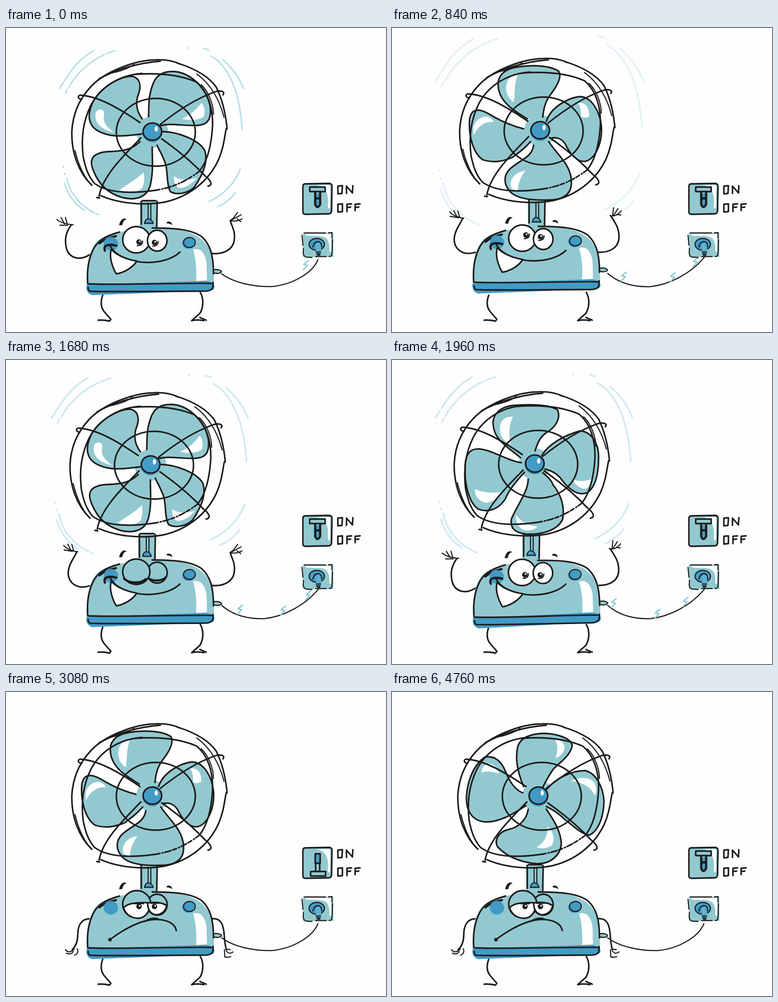
Write an HTML page that moves like this. It is 837x669 px and loops after 5040 ms.

```html
<!DOCTYPE html>
<html lang="en">
<head>
<meta charset="utf-8">
<title>Happy fan</title>
<style>
html, body { margin: 0; width: 100%; height: 100%; overflow: hidden; background: #fefefe; }
svg { display: block; width: 100vw; height: 100vh; }
path, ellipse, rect, circle { fill: none; stroke-linecap: round; stroke-linejoin: round; }
.ink { stroke: #1d1b1b; stroke-width: 3.4; }
.thin { stroke-width: 2.4; }
.bold { stroke-width: 4.8; }
.teal { fill: #92c9d0; }
.blue { fill: #429bc5; }
.pale { fill: #5fb0d4; }
.white { fill: #fefefe; }
.black { fill: #1d1b1b; }
.zap { stroke: #8fcbd4; stroke-width: 3; }
#air { stroke: #a4d5e0; stroke-width: 3.6; }
#burst { stroke: #93cbdc; stroke-width: 2.6; }
</style>
</head>
<body>
<svg viewBox="0 0 837 669" preserveAspectRatio="none">
<g id="head">
  <g id="air">
    <path d="M118 133L127 119M130 115C147 86 168 64 193 50"/>
    <path d="M131 143L135 135M138 131C153 102 183 74 216 59M220 57L240 50"/>
    <path d="M401 44h1M436 45L446 48M452 62L464 70C501 102 516 160 520 223M478 70C503 92 515 112 523 133"/>
    <path d="M126 305v2M129 320v2M134 330C140 364 165 393 195 407M129 342C139 373 154 390 173 401M199 409L204 411"/>
    <path d="M447 382C484 364 505 340 516 310M466 393C484 386 498 373 505 362"/>
  </g>
  <path class="teal" d="M295 380H334V446H295Z"/>
  <path class="ink" d="M298 382V432M333 382L332 437"/>
  <path class="ink thin" d="M313 386V421M319 386V421"/>
  <path class="blue ink thin" d="M305 430C306 417 321 416 324 430Z"/>
  <path class="ink" d="M300 380H330"/>
  <g id="blades"></g>
  <path class="ink" d="M189 346C160 318 144 275 145 228C147 190 160 158 186 130C215 98 280 71 330 70C352 69 368 72 382 79"/>
  <path class="ink" d="M205 112C240 92 290 77 340 73M377 77C422 91 449 110 463 130C477 158 484 190 487 222"/>
  <path class="ink thin" d="M232 99C250 96 270 89 282 80M420 101C452 124 471 160 480 196"/>
  <path class="ink" d="M485 222C481 240 480 262 468 290C445 340 400 372 350 383C300 392 245 385 209 369M200 373L206 374"/>
  <path class="ink" d="M300 100C250 103 208 130 187 170C170 205 165 240 170 283C175 308 181 326 195 342C225 364 275 365 330 357"/>
  <path class="ink" stroke-dasharray="9 5 2 4 14 4" d="M330 357C370 350 395 338 425 316"/>
  <path class="ink" d="M425 316C447 290 453 250 455 215C456 175 445 140 420 119C385 104 340 98 285 102"/>
  <path class="ink thin" d="M430 125C447 140 457 170 457 190M152 270C160 303 170 322 181 337"/>
  <ellipse class="ink" cx="330" cy="229.500" rx="87" ry="74.500"/>
  <path class="ink" d="M166 157C157 156 157 147 166 148C202 151 242 172 295 208"/>
  <path class="ink" d="M478 147C484 138 470 137 459 141C420 155 380 180 340 212"/>
  <path class="ink" d="M343 244C380 270 410 295 438 325C451 335 457 346 445 348"/>
  <path class="ink" d="M297 242C260 280 213 325 205 370"/>
  <ellipse class="blue" cx="322" cy="231" rx="22" ry="21" opacity=".8"/>
  <ellipse class="blue ink" cx="322.500" cy="228" rx="20.500" ry="19"/>
  <ellipse class="white" cx="331" cy="222" rx="3.500" ry="6"/>
</g>

<g class="ink">
  <path id="legL"/>
  <path data-leg="0" d="M428 582C436 596 435 615 427 628L409 644Q422 641 436 644M427 637L441 643"/>
  <path data-leg="1" d="M438 586C440 600 447 612 443 621L437 636L463 620M437 636L452 629"/>
</g>
<g class="ink" id="arms">
  <g data-left="A"><path d="M184 499C160 514 139 505 133 485C128 463 133 448 144 433"/><path class="thin" d="M112 421Q122 431 148 433M121 417L129 431M131 417L135 431M119 434L136 434"/></g>
  <g data-left="B"><path d="M184 497C156 506 138 490 137 470C137 450 150 436 156 422"/><path class="thin" d="M127 408Q136 419 158 422M136 405L143 419M145 406L149 420M128 418L146 421"/></g>
  <g data-left="D"><path d="M183 499C165 500 158 515 158 535C158 550 153 560 146 567"/><path class="thin" d="M131 567Q138 577 150 566M133 575Q144 579 148 571M157 565Q161 575 151 579"/></g>
  <g data-right="A"><path d="M453 496C478 499 501 488 503 465C505 447 498 438 494 424L500 420"/><path class="thin" d="M494 424Q508 427 520 420M498 422L518 411M499 421L510 406M509 420L517 426"/></g>
  <g data-right="B"><path d="M454 497C484 498 500 484 500 463C500 443 492 433 482 417"/><path class="thin" d="M480 416Q492 421 505 406M488 416L498 401M486 416L488 399M495 414L504 415"/></g>
  <g data-right="D"><path d="M453 499C475 496 480 515 481 540C482 555 484 562 485 567"/><path class="thin" d="M481 567L482 583Q490 585 495 582M485 569Q491 579 500 572M487 566L494 567"/></g>
</g>

<path class="ink thin" id="cord"/>
<g id="zaps"></g>

<g id="body">
  <path class="teal ink thin" d="M457 532Q470 530 475 536Q472 542 457 539"/>
  <path class="teal" d="M178 578C176 530 180 490 202 468C225 450 285 440 335 440C400 440 435 458 450 490C460 520 458 560 458 575Z"/>
  <path class="white" d="M412 488C430 481 442 500 442 525C442 545 444 555 440 562L418 562C421 535 418 505 412 488Z"/>
  <path class="blue" d="M179 563C240 563 350 560 440 556C461 560 463 571 455 577C380 581 260 585 190 588C178 585 174 572 179 563Z"/>
  <path class="ink" d="M180 562C178 535 182 510 190 492C200 468 218 458 250 449"/>
  <path class="ink" d="M322 440C370 440 410 443 432 460C450 477 457 500 457 541"/>
  <path class="ink" d="M182 563C260 566 370 561 455 562M181 571C181 584 190 578 202 580C280 580 370 580 440 579C455 578 457 572 456 560"/>
  <path class="ink bold" d="M206 474Q218 463 242 458"/>
  <ellipse class="blue" cx="231" cy="475" rx="16" ry="15"/>
  <ellipse class="blue" cx="402" cy="474" rx="14" ry="12"/>
  <ellipse class="ink thin" cx="404" cy="472" rx="13" ry="11"/>
  <path class="black" d="M249 434C252 422 258 416 266 421C260 422 258 426 256 434Z"/>
  <path class="black" d="M354 427C362 424 366 429 366 434C362 431 359 430 354 430Z"/>
  <g data-mouth="happy">
    <path class="ink bold" d="M218 490C213 479 224 474 243 479"/>
    <path class="ink" d="M229 478C238 500 272 515 310 516C345 516 370 506 383 493"/>
    <path class="white ink" d="M232 487C226 505 236 530 243 541C262 538 280 526 288 513C265 509 245 501 232 487Z"/>
  </g>
  <g data-mouth="sad">
    <path class="ink" d="M230 544C260 522 290 505 322 501C345 499 372 505 375 525M310 502Q326 495 336 500"/>
    <circle class="black" cx="229" cy="545" r="4"/>
  </g>
  <g data-eyes="open up">
    <ellipse class="white ink" cx="287" cy="466" rx="30" ry="29"/>
    <ellipse class="white ink" cx="333" cy="468" rx="21.500" ry="23"/>
    <g id="pupils"></g>
  </g>
  <g data-eyes="shut">
    <ellipse class="teal ink" cx="333" cy="468" rx="22" ry="23"/>
    <ellipse class="teal ink" cx="287" cy="466" rx="30" ry="28"/>
    <path class="ink bold" d="M260 481C272 493 298 492 308 482M315 481C327 488 345 486 352 478"/>
  </g>
  <g data-eyes="sad">
    <ellipse class="teal ink" cx="333" cy="468" rx="22" ry="23"/>
    <ellipse class="teal ink" cx="288" cy="467" rx="31" ry="30"/>
    <path class="white ink" d="M259 475C266 465 290 462 314 464C320 480 308 498 290 498C274 497 263 488 259 475Z"/>
    <path class="white ink" d="M312 464C328 462 344 463 354 470C351 484 340 491 328 490C317 487 312 478 312 464Z"/>
    <g id="lowPupils"></g>
    <path class="ink thin" d="M283 466H303M318 465H336"/>
  </g>
</g>

<g id="switch">
  <path class="teal" d="M656 344H716V408H656Z"/>
  <path class="white" d="M686 346H714V396Q709 400 709 392Q713 352 686 346Z"/>
  <path class="ink" d="M659 343L712 342Q719 343 718 350L717 403Q716 410 709 409L660 410Q653 410 654 402L654 349Q654 343 659 343Z"/>
  <g data-power="on">
    <path class="blue" d="M679 364H690V392H679Z"/>
    <path class="teal ink" d="M669 350H703V360H669Z"/>
    <path class="ink bold" d="M681 361V388Q686 400 692 388V361M682 375H691"/>
  </g>
  <g data-power="off">
    <path class="blue ink" d="M681 356H692V377H681Z"/>
    <path class="teal ink" d="M682 377H691V395H682Z"/>
    <path class="teal ink" d="M671 395H704V405H671Z"/>
  </g>
</g>
<g class="ink" role="img" aria-label="ON OFF">
  <path d="M731 348L741 347L740 364L731 365ZM750 364V348L763 363L764 347"/>
  <path d="M731 388L741 387L741 404L731 405ZM751 404V388L761 387M751 395L759 394M769 402V388L780 387M769 395L777 394"/>
</g>

<g id="outlet">
  <path class="teal" d="M654 451H721V504H654Z"/>
  <path class="white" d="M660 453H717V491Q713 497 712 488Q714 459 692 458L660 457Z"/>
  <path class="ink thin" d="M657 451H704M710 451L718 450V462M719 466L718 497Q718 502 712 503M705 503H682M674 505L660 504Q653 500 655 490V485M654 478L652 456"/>
  <ellipse class="blue ink thin" cx="684.500" cy="476" rx="17" ry="13"/>
  <path class="pale" d="M681 477Q688 468 695 477L693 500H684Z"/>
  <path class="ink thin" d="M676 482Q679 470 688 470Q696 472 695 482M683 493H693M684 497H692M686 500H691"/>
</g>
<g id="burst">
  <path d="M625 424L631 433M653 420L655 426M623 451L632 454M735 427L740 419M753 427L761 417M750 443L759 442M734 437L737 434"/>
  <path d="M630 511L637 514M628 531L640 524M647 527L644 531M725 509L734 513M728 522L733 530M745 515L750 532"/>
</g>
</svg>
<script>
const $ = id => document.getElementById(id);

// Each set: head offset it was drawn at, blade outlines, shine shapes.
const sets = [
  [0, 0,
   ['M300 200C285 180 286 160 292 145C299 125 294 108 276 106C250 107 210 130 193 160C180 185 178 210 200 225C225 240 250 240 300 233',
    'M314 195C315 165 313 150 325 120C335 98 355 93 380 97C415 105 445 140 450 175C452 200 445 212 425 214C395 217 365 208 340 215',
    'M345 228C375 228 425 245 438 270C445 295 435 320 415 350C400 365 375 368 362 360C352 340 358 310 348 290C340 270 335 265 333 258',
    'M295 250C270 275 240 270 215 273C190 278 182 290 193 315C205 345 225 365 260 374C290 380 312 370 318 345C325 315 322 290 322 262'],
   'M198 185C193 205 205 222 238 230C222 218 212 208 216 190C218 178 204 176 198 185ZM430 165C420 180 405 192 388 200C405 204 425 203 435 195C440 185 436 168 430 165ZM370 326C370 345 375 352 385 352C400 350 412 340 420 330C400 335 380 335 370 326ZM303 318C285 335 265 345 250 357C270 363 290 362 300 352C305 340 305 330 303 318Z'],
  [4, -3,
   ['M298 200C275 185 245 170 236 140C228 112 240 92 275 86C310 80 350 83 367 95C376 108 362 130 348 148C336 165 334 180 332 196',
    'M340 205C350 175 385 155 412 151C440 150 458 185 461 215C464 250 450 285 428 293C410 297 395 280 385 262C378 245 365 240 352 242',
    'M312 258C308 285 285 288 260 310C245 325 245 345 262 362C280 378 320 380 355 378C385 375 397 360 395 335C393 300 365 280 345 250',
    'M290 222C262 215 240 205 215 190C190 175 175 178 171 200C168 235 178 275 200 290C225 298 245 293 265 285C285 270 295 262 305 250'],
   'M279 99C262 103 248 115 252 140C255 152 262 160 268 163C272 140 268 120 279 99ZM410 165C425 163 436 175 434 195C428 198 420 198 416 195C417 180 414 172 410 165ZM294 314C275 316 258 330 262 350C265 356 272 358 277 357C278 340 285 325 294 314ZM180 236C176 215 185 198 205 195C215 194 222 202 224 207C205 205 190 215 180 236Z'],
  [-4, 6,
   ['M292 210C275 185 245 165 246 135C245 110 265 92 300 91C335 92 375 100 385 115C390 135 365 160 350 180C340 195 335 205 330 213',
    'M335 218C355 195 390 180 420 180C445 185 456 215 455 245C452 280 435 315 415 325C395 330 385 318 383 300C378 280 360 262 345 250',
    'M303 262C298 290 270 300 240 315C220 325 215 345 230 362C250 380 290 390 320 390C350 388 364 375 366 350C366 320 360 300 335 275',
    'M288 225C255 215 230 195 205 175C190 165 175 170 170 190C165 220 170 255 185 275C205 292 240 290 265 280C280 272 290 265 300 255'],
   'M300 107C280 112 262 122 264 145C266 158 272 164 278 165C280 140 287 120 300 107ZM387 198C405 190 430 192 434 210C436 225 430 228 426 228C422 210 410 200 387 198ZM270 314C252 316 235 328 236 345C240 358 248 362 253 362C250 342 258 325 270 314ZM178 217C176 200 185 186 200 184C210 183 220 195 225 202C205 195 190 200 178 217Z'],
  [-8, 0,
   ['M283 215C260 195 230 180 224 150C218 125 232 105 265 100C300 97 345 97 365 110C372 130 360 148 340 160C325 170 320 185 315 200',
    'M330 210C345 185 380 165 415 156C440 158 456 185 455 215C455 250 448 280 430 292C410 300 390 285 375 265C365 250 350 243 337 240',
    'M300 262C300 290 275 320 263 350C260 370 270 380 295 383C330 385 365 375 376 350C380 325 375 300 355 275C350 262 340 255 332 248',
    'M285 226C255 222 225 200 195 196C170 193 160 210 161 240C160 275 170 315 190 328C215 338 238 325 250 305C258 285 275 265 292 247'],
   'M267 125C245 122 232 140 240 165C245 178 255 184 262 185C256 165 258 140 267 125ZM438 262C425 268 410 267 398 263C405 278 418 285 428 283C435 278 438 270 438 262ZM273 340C272 355 278 370 292 375C305 377 318 372 320 366C300 365 282 355 273 340ZM183 284C182 300 192 312 208 314C225 312 235 300 241 290C222 294 200 292 183 284Z'],
  [0, 0,
   ['M290 208C278 180 270 150 277 120C283 100 305 92 335 91C365 92 395 102 397 118C393 140 370 155 355 170C345 185 338 197 332 210',
    'M340 215C360 190 395 173 425 173C450 178 465 210 467 240C466 275 455 305 435 315C415 312 400 295 380 280C365 265 352 258 340 252',
    'M300 258C297 280 280 298 255 303C235 308 225 325 232 340C250 360 280 375 320 378C350 378 370 360 373 335C372 305 355 280 340 258',
    'M288 222C270 215 258 195 250 175C240 150 225 140 205 143C180 160 166 195 164 230C163 260 175 283 205 286C235 287 265 270 295 250'],
   'M358 103C372 104 382 115 380 125C376 138 368 143 360 145C366 130 366 115 358 103ZM394 196C410 188 435 185 446 200C452 212 450 225 446 228C440 210 420 198 394 196ZM342 296C355 305 360 325 352 337C342 345 330 345 318 342C335 332 345 315 342 296ZM197 177C198 163 208 155 222 160C230 165 234 173 236 180C222 174 208 174 197 177Z']
];
$('blades').innerHTML = sets.map(([x, y, outlines, shine], i) => {
  const d = outlines.join('');
  return `<g data-blades="${i}" transform="translate(${-x} ${-y})"><path class="teal" d="${d}"/>
    <circle class="teal" cx="${322 + x}" cy="${229 + y}" r="35"/>
    <path class="ink" d="${d}"/><path class="white" d="${shine}"/></g>`;
}).join('');

const pupil = (x, y) => `<circle class="black" cx="${x}" cy="${y}" r="6"/><circle class="white" cx="${x + 1.5}" cy="${y - 1.5}" r="2"/>`;
const look = (x, y) => pupil(x, y) + `<path class="ink thin" d="M${x - 4} ${y + 8}Q${x + 8} ${y + 8} ${x + 8} ${y - 2}"/>`;
$('lowPupils').innerHTML = pupil(293, 472) + pupil(327, 472);

const legs = ['L231 641L228 645Q215 642 203 643', 'L229 641L228 645Q215 642 203 643',
              'L231 641L228 645Q213 640 204 630', 'L231 641L228 645Q214 641 203 637'];
const bends = ['207 605 210 617 217 625', '209 605 213 617 219 625'];
const cords = ['M475 541C500 560 545 570 585 569C630 565 675 540 687 510',
               'M475 540C500 562 535 571 570 569C610 565 660 540 689 503'];
const still = 'translate(0 0)';

// blades, head x, head y, body, left arm, right arm, eyes, air scale, zap places
const steps = [
  [0, 0, 0, still, 'A', 'A', 'open', 1, [660]],
  [3, 0, 0, still, 'B', 'B', 'open', .96, [604, 664]],
  [2, 0, 0, still, 'B', 'A', 'open', .94, [552, 642]],
  [1, 4, -3, 'translate(0 -3.500)', 'B', 'B', 'up', 1.135, [510, 618, 668]],
  [4, 0, 0, still, 'B', 'A', 'up', .96, [496, 585, 662]],
  [2, -4, 6, 'translate(0 5)', 'A', 'B', 'shut', 1.205, [488, 553, 658]],
  [0, -4, 2, still, 'B', 'A', 'shut', 1.07, [515, 610, 665]],
  [3, -8, 0, 'translate(1 1) rotate(-.8 320 580)', 'A', 'B', 'open', 1.07, [488, 584, 646]],
  [1, -3, 0, 'translate(0 -2)', 'B', 'A', 'open', 1, [500, 560]],
  [4, 0, 0, still, 'B', 'B', 'open', .93, []],
  [3, 0, 0, still, 'A', 'A', 'open', 0, []],
  [1, 0, 0, still, 'D', 'D', 'sad', 0, []],
  [2, 0, 0, still, 'D', 'D', 'sad', 0, []],
  [4, 0, 0, still, 'D', 'D', 'sad', 0, []]
];

function pick(key, value) {
  for (const el of document.querySelectorAll(`[data-${key}]`))
    el.style.display = el.dataset[key].split(' ').includes(String(value)) ? '' : 'none';
}

function zap(x) {
  const y = 560 - .0042 * (x - 565) ** 2;
  return `<path class="zap" transform="translate(${x} ${y})" d="M6 -10L-4 -2L4 0L-5 10"/>`;
}

function draw(n) {
  const [blades, hx, hy, body, left, right, eyes, air, zaps] = steps[Math.min(n, 13)];
  $('head').setAttribute('transform', `translate(${hx} ${hy})`);
  $('body').setAttribute('transform', body);
  $('arms').setAttribute('transform', body);
  $('air').setAttribute('transform', `translate(322 225) scale(${air}) translate(-322 -225)`);
  $('air').style.opacity = air ? .7 - (air - 1) * 3 : 0;
  pick('blades', blades);
  pick('left', left);
  pick('right', right);
  pick('eyes', eyes);
  pick('mouth', eyes == 'sad' ? 'sad' : 'happy');
  pick('leg', n == 5 ? 1 : 0);
  pick('power', n > 8 && n < 16 ? 'off' : 'on');
  $('pupils').innerHTML = eyes == 'up' ? look(295, 459) + look(327, 463) : look(293, 471) + look(327, 472);
  const tap = n > 13 && n < 17 ? n - 13 : 0;
  $('legL').setAttribute('d', `M213 588C${bends[tap == 1 ? 1 : 0]}${legs[tap]}`);
  $('cord').setAttribute('d', cords[n > 2 && n < 9 ? 1 : 0]);
  $('zaps').innerHTML = zaps.map(zap).join('');
  $('burst').style.display = n == 9 || n == 15 || n == 16 ? '' : 'none';
  $('burst').setAttribute('transform', n == 16 ? 'translate(686 477) scale(.66) translate(-686 -477)' : still);
}

const start = performance.now();
let last = -1;
function tick() {
  const n = Math.floor((performance.now() - start) % 5040 / 280);
  if (n != last) draw(last = n);
  requestAnimationFrame(tick);
}
tick();
</script>
</body>
</html>
```
